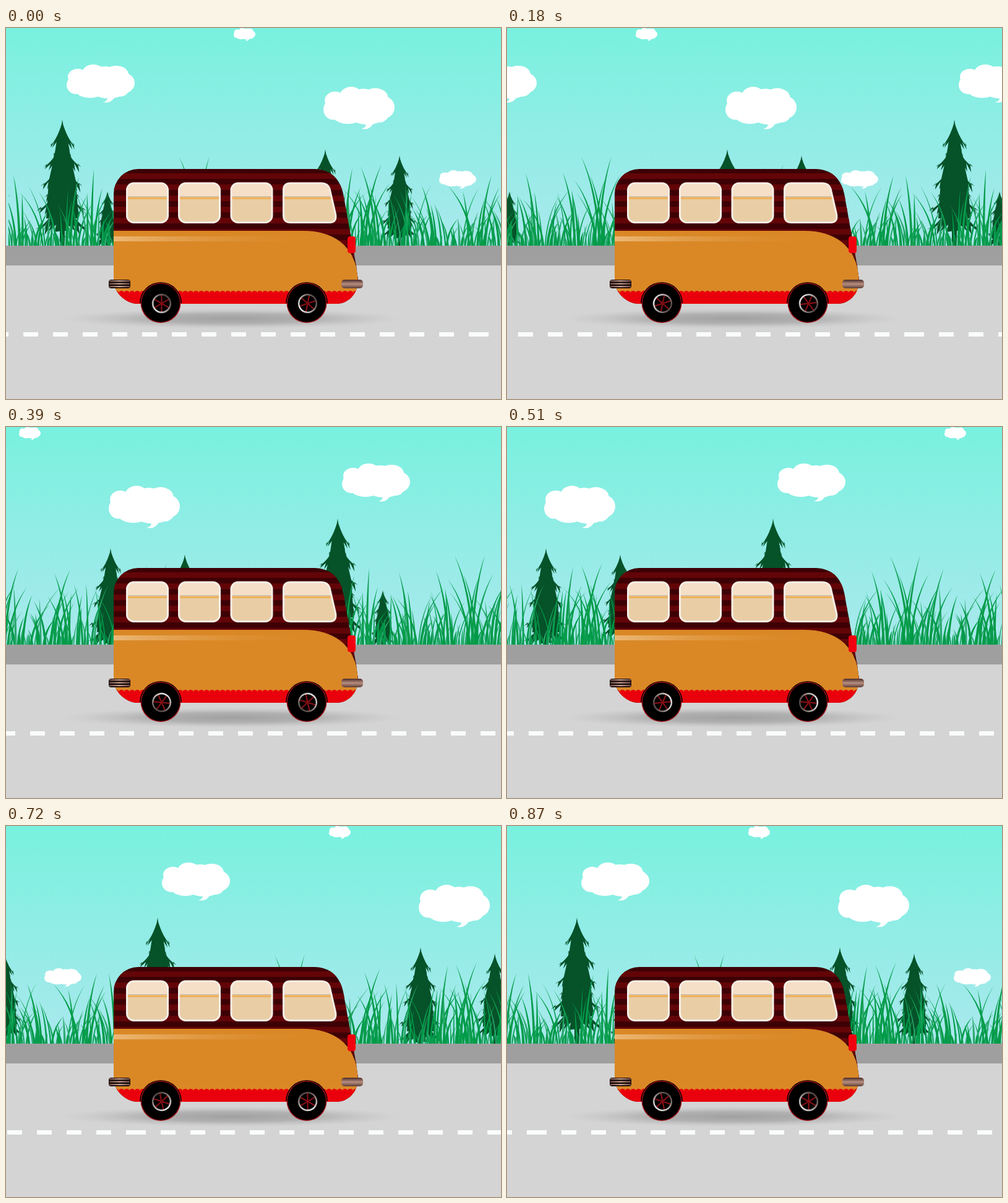
An HTML page with a canvas for the animation above (0.9 s loop, 800 by 600 pixels).

```html
<!DOCTYPE html>
<html lang="en">
<head>
<meta charset="utf-8">
<title>Bus ride</title>
<style>
  html, body { margin: 0; width: 100%; height: 100%; overflow: hidden; background: #d4d4d4; }
  canvas { display: block; width: 800px; height: 600px; }
</style>
</head>
<body>
<canvas id="stage" width="800" height="600"></canvas>
<script>
const ctx = document.getElementById('stage').getContext('2d');
const TILE = 792, STEP = 30, STEPS = 30, GROUND = 352;

function layer(w, h, draw) {
  const c = document.createElement('canvas');
  c.width = w;
  c.height = h;
  draw(c.getContext('2d'));
  return c;
}

function seeded(seed) {
  return () => {
    seed = (seed * 1664525 + 1013904223) >>> 0;
    return seed / 4294967296;
  };
}

function gradient(g, x0, y0, x1, y1, ...stops) {
  const lg = g.createLinearGradient(x0, y0, x1, y1);
  stops.forEach((c, i) => lg.addColorStop(i / (stops.length - 1), c));
  return lg;
}

function rect(g, fill, x, y, w, h, r = 0) {
  g.fillStyle = fill;
  g.beginPath();
  g.roundRect(x, y, w, h, r);
  g.fill();
}

function disc(g, fill, x, y, r) {
  g.fillStyle = fill;
  g.beginPath();
  g.arc(x, y, r, 0, 7);
  g.fill();
}

// Scenery: clouds, trees and grass in one repeating strip
const PUFFS = [
  [18, 20, 16, 13], [43, 14, 18, 14], [62, 16, 20, 13], [80, 16, 20, 14],
  [91, 30, 19, 17], [15, 33, 15, 15], [38, 41, 24, 13], [68, 41, 27, 14],
  [86, 39, 15, 13], [55, 29, 38, 21]
];

function cloud(g, x, y, w, h) {
  g.save();
  g.translate(x, y);
  g.scale(w / 110, h / 62);
  g.fillStyle = '#fff';
  for (const [cx, cy, rx, ry] of PUFFS) {
    g.beginPath();
    g.ellipse(cx, cy, rx, ry, 0, 0, 7);
    g.fill();
  }
  g.fill(new Path2D('M66 50Q68 59 59 61Q73 64 79 50Z'));
  g.restore();
}

// Each tier: height of the branch root, height of its tip, half width
const TIERS = [
  [16, 43, 21], [40, 58, 15], [48, 77, 31], [72, 108, 34],
  [92, 126, 30], [108, 148, 40], [130, 178, 44]
];

function tree(g, x, y, scale) {
  const rnd = seeded(11);
  g.save();
  g.translate(x, y);
  g.scale(scale, scale);
  g.fillStyle = '#065229';
  g.fill(new Path2D('M0 0Q2 20 9 34L13 60L22 100L26 160H-26L-22 100L-13 60L-9 34Q-2 20 0 0Z'));
  g.fillRect(-4, 40, 8, 170);
  for (const [root, tip, half] of TIERS) {
    for (const side of [-1, 1]) {
      const reach = half * (0.9 + rnd() * 0.15);
      g.beginPath();
      g.moveTo(0, root - 12);
      g.quadraticCurveTo(side * reach * 0.42, tip - 11, side * reach, tip);
      for (let i = 1; i < 5; i++) {
        const at = reach * (1 - i / 5);
        g.lineTo(side * (at + 1), tip - 5 - rnd() * 3);
        g.lineTo(side * (at + 2 + 3 * rnd()), tip + 2 + rnd() * 9);
      }
      g.lineTo(0, tip + 2);
      g.fill();
    }
  }
  g.restore();
}

function blade(g, base, tipX, tipY, width, color) {
  const midX = base + (tipX - base) * 0.16;
  const midY = GROUND + (tipY - GROUND) * 0.62;
  g.fillStyle = color;
  g.beginPath();
  g.moveTo(base - width / 2, GROUND);
  g.quadraticCurveTo(midX - width / 2, midY, tipX, tipY);
  g.quadraticCurveTo(midX + width / 2, midY, base + width / 2, GROUND);
  g.fill();
}

const TALL = [
  [310, 280, 208], [308, 329, 207], [598, 573, 224], [580, 607, 220], [425, 451, 230],
  [270, 250, 233], [345, 367, 229], [206, 190, 235], [138, 142, 228], [768, 785, 238],
  [104, 118, 240], [446, 425, 236], [548, 560, 226], [690, 672, 255], [22, 12, 238]
];

function grass(g) {
  const rnd = seeded(5);
  const greens = ['#009b48', '#0a9f50', '#00974a', '#2ba86c'];
  for (let i = 0; i < 300; i++) {
    const x = 4 + i * TILE / 300 + rnd() * 4;
    const h = 16 + 84 * rnd() ** 1.6;
    const lean = (rnd() - 0.5) * h * 0.95;
    blade(g, x, x + lean, GROUND - h, 1.6 + rnd() * 2.2, greens[i % 4]);
  }
  for (const [base, tipX, tipY] of TALL) {
    blade(g, base, tipX, tipY, 3.8, '#0a9c4c');
    blade(g, base + 5, tipX + 14, tipY + 30, 3.2, '#009b48');
    blade(g, base - 6, tipX - 11, tipY + 38, 3.2, '#009b48');
  }
}

const scenery = layer(TILE, GROUND, g => {
  for (const shift of [-TILE, 0, TILE]) {
    g.setTransform(1, 0, 0, 1, shift - 4, 0);
    cloud(g, 98, 59, 110, 62);
    cloud(g, 513, 95, 115, 69);
    cloud(g, 368, 0, 35, 21);
    cloud(g, 700, 230, 60, 30);
    tree(g, 91, 148, 1);
    tree(g, 516, 196, 0.85);
    tree(g, 636, 206, 0.74);
    tree(g, 164, 264, 0.48);
    grass(g);
  }
});

const backdrop = layer(800, 600, g => {
  rect(g, gradient(g, 0, 0, 0, GROUND, '#79f1df', '#aae8ed'), 0, 0, 800, GROUND);
  rect(g, '#9f9f9f', 0, GROUND, 800, 32);
  rect(g, '#d4d4d4', 0, 384, 800, 216);
});

// Bus
const BODY = new Path2D('M174 268A40 40 0 0 1 214 228H498C524 228 540 244 545 268L557 335L566 385L569 408C569 430 553 446 534 446H213C194 446 174 428 174 408Z');
const PAINT = new Path2D('M174 328H480C530 328 561 352 568 396L570 432H174Z');

function pane(g, path) {
  g.save();
  g.clip(path);
  rect(g, '#f5dfc7', 190, 248, 350, 24);
  rect(g, '#e9cea5', 190, 272, 350, 46);
  rect(g, '#c4beb6', 190, 272, 350, 1.5);
  rect(g, '#efb35c', 190, 273.5, 350, 3.5);
  g.restore();
  g.strokeStyle = '#f5eee6';
  g.lineWidth = 3;
  g.stroke(path);
}

function tyre(g, x) {
  g.fillStyle = '#000';
  g.beginPath();
  g.arc(x, 445, 34, Math.PI, 0);
  g.fill();
  disc(g, '#9d1118', x, 444.5, 32.5);
  disc(g, '#000', x, 444.5, 31);
}

const bus = layer(800, 600, g => {
  g.save();
  g.translate(365, 470);
  g.scale(1, 0.06);
  const shade = g.createRadialGradient(0, 0, 0, 0, 0, 272);
  shade.addColorStop(0, 'rgba(100,100,100,.46)');
  shade.addColorStop(0.5, 'rgba(105,105,105,.32)');
  shade.addColorStop(1, 'rgba(160,160,160,0)');
  disc(g, shade, 0, 0, 272);
  g.restore();

  g.save();
  g.clip(BODY);
  rect(g, '#3d0004', 170, 228, 404, 220);
  for (let y = 235; y < 400; y += 18) rect(g, '#630508', 170, y, 404, 9);
  g.fillStyle = '#da8826';
  g.fill(PAINT);
  rect(g, gradient(g, 174, 0, 510, 0, '#ecb875', 'rgba(218,136,38,0)'), 174, 337, 336, 8);
  rect(g, '#ea000c', 170, 430, 404, 18);
  for (let x = 178; x < 574; x += 8.6) disc(g, '#ea000c', x, 429.5, 4.6);
  g.restore();

  for (const x of [195.5, 279.5, 364, 448.5]) {
    const path = new Path2D();
    if (x < 448) path.roundRect(x, 251, 66, 63.5, 11);
    else path.addPath(new Path2D('M460 251H510Q520 251 523 260L532.5 301Q535 314.5 523 314.5H460Q448.5 314.5 448.5 303V262Q448.5 251 460 251Z'));
    pane(g, path);
  }

  rect(g, '#f0000f', 552, 337, 13, 27, 4);
  rect(g, '#140606', 166, 407, 35, 14, 4);
  const chrome = gradient(g, 166, 0, 201, 0, '#6b4a42', '#c9a595', '#6b4a42');
  for (const y of [408, 412.5, 417]) rect(g, chrome, 167, y, 33, 2.3);
  rect(g, gradient(g, 0, 407, 0, 421, '#4a2b27', '#b88f80', '#5f3f38'), 542, 407, 35, 14, 5);
  tyre(g, 250);
  tyre(g, 486);
});

const hub = layer(40, 40, g => {
  g.translate(20, 20);
  g.strokeStyle = '#a5141b';
  g.lineWidth = 1.8;
  for (let i = 0; i < 6; i++) {
    g.beginPath();
    g.moveTo(0, 0);
    g.lineTo(0, -13.5);
    g.stroke();
    g.rotate(Math.PI / 3);
  }
  disc(g, '#7d0d13', 0, 0, 2.6);
  g.strokeStyle = gradient(g, -11, 11, 11, -11, '#ffffff', '#b5aaa6', '#5a4a48');
  g.lineWidth = 2.2;
  g.beginPath();
  g.arc(0, 0, 14.3, 0, 7);
  g.stroke();
});

// Two linear halves, meeting at step 15
const halves = (n, first, second) => first * Math.min(n, 15) + second * Math.max(n - 15, 0);

function render(n) {
  ctx.drawImage(backdrop, 0, 0);

  const x = 4 - Math.round(halves(n, 80 / 3, 26.43));
  ctx.drawImage(scenery, x, 0);
  ctx.drawImage(scenery, x + TILE, 0);

  const seam = 748 - Math.round(halves(n, 17.6, 32.27));
  for (let d = seam; d > -24; d -= 48) rect(ctx, '#fafcfb', d, 492, 24, 7);
  for (let d = seam + 8; d < 800; d += 48) rect(ctx, '#fafcfb', d, 492, 24, 7);

  ctx.drawImage(bus, 0, 0);
  for (const [cx, phase] of [[251.5, 0], [487.5, 0.2]]) {
    ctx.save();
    ctx.translate(cx, 445.5);
    ctx.rotate(n / STEPS * Math.PI * 2 + phase);
    ctx.drawImage(hub, -20, -20);
    ctx.restore();
  }
}

const start = performance.now();
function tick() {
  render(Math.floor((performance.now() - start) / STEP) % STEPS);
  requestAnimationFrame(tick);
}
tick();
</script>
</body>
</html>
```
